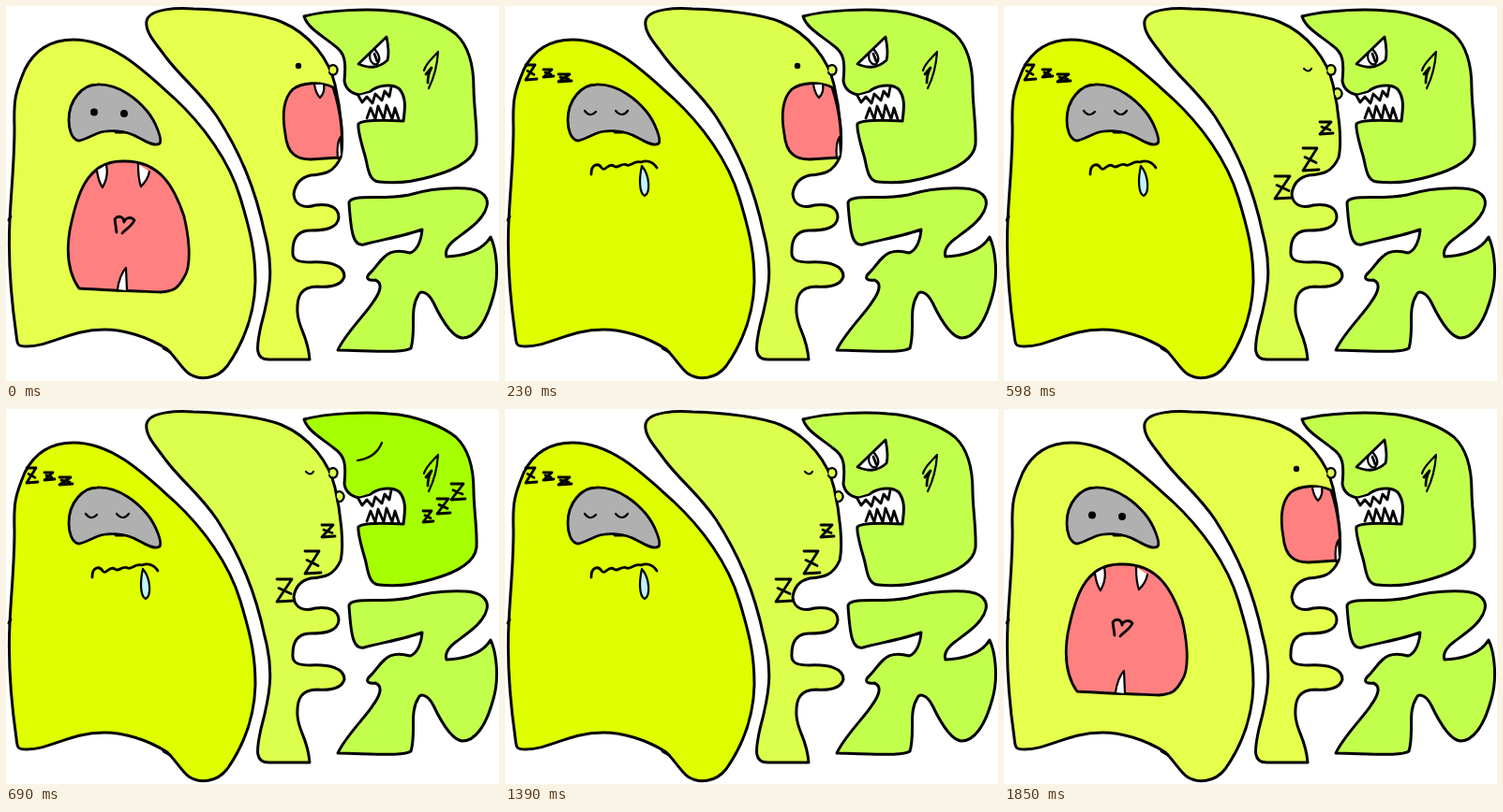
An HTML page for the animation above (2080 ms loop, 526 px wide and 401 px high).

```html
<!DOCTYPE html>
<html lang="en">
<head>
<meta charset="utf-8">
<title>Sleepy monsters</title>
<style>
html, body { margin: 0; width: 100%; height: 100%; overflow: hidden; background: #fff; }
svg { display: block; }
svg * { stroke-linecap: round; stroke-linejoin: round; }
path { fill: none; stroke: #000; stroke-width: 2.8; }
.body { fill: var(--skin); stroke-width: 3; }
.thin { stroke-width: 2.2; }
.mouth { fill: #ff8080; }
.white { fill: #fff; }
.grey { fill: #b0b0b0; }
.drool { fill: #c0f6ff; }
.asleep, .sleeping > .awake { display: none; }
.sleeping > .asleep { display: inline; }
</style>
</head>
<body>
<svg width="526" height="401" viewBox="0 0 526 401">
  <g id="blob">
    <path class="body" d="M4 229C6 190 9 165 9 130C8 100 10 92 20 68C30 48 47 36 72 36C115 36 150 72 180 99C210 127 238 165 250 205C262 245 266 265 266 295C265 335 250 365 236 385C225 399 207 401 195 393C188 388 182 377 172 367C150 353 125 346 105 346C68 346 48 364 22 364C12 364 12 362 11 352C5 310 2 270 4 229Z"/>
    <path d="M3 229l2-4M168 366l7 4"/>
    <path class="grey" d="M67 122C67 100 82 84 97 84C122 83 142 102 151 113C160 124 167 143 164 147C158 151 148 144 142 141C125 131 105 133 98 136C88 140 82 144 77 144C70 142 67 132 67 122Z"/>
    <path d="M117 135h8"/>
    <g class="awake">
      <circle cx="94" cy="113.500" r="4"/><circle cx="126" cy="115" r="4"/>
      <path class="mouth" d="M78 302C66 285 64 265 68 240C75 205 85 165 125 166C165 165 180 195 190 225C197 255 197 280 190 290C183 303 178 305 165 306C140 305 110 304 78 302Z"/>
      <path class="white thin" d="M97 176C98 183 100 190 103 194C107 187 109 179 107 170M141 169C141 180 142 188 144 193C149 188 152 183 153 177M119 303C120 294 124 284 128 280L129 304"/>
      <path d="M118 242L116 228C119 224 125 224 126 231C127 226 134 225 137 229C134 236 128 238 124 243"/>
    </g>
    <g class="asleep">
      <path class="thin" d="M85 112q6 8 12 1M118 112q7 8 13 0"/>
      <path d="M92 180C92 168 100 168 103 173C107 178 110 167 116 171C120 175 124 167 130 170C133 172 138 165 145 167C150 165 157 165 162 173"/>
      <path class="drool thin" d="M146 171C143 185 143 200 149 203C155 200 155 182 146 171Z"/>
    </g>
  </g>
  <g id="tall">
    <path class="body" d="M150 16C153 2 185 2 200 3C235 4 275 9 294 17C325 30 345 58 351 84C357 110 361 145 357 162C350 178 340 180 325 181C312 184 308 194 307 201C308 213 318 217 330 213C345 211 355 215 355 226C354 238 340 240 325 240C310 240 306 250 306 262C305 272 312 274 325 274C345 273 361 277 361 289C358 300 345 301 332 300C315 300 310 310 311 328C312 345 322 352 324 378L282 378C265 379 267 365 272 342C282 305 286 280 276 243C266 195 250 157 225 118C206 90 188 78 170 54C160 40 148 28 150 16Z"/>
    <path class="body thin" d="M346 64C351 61 355 66 353 71C351 75 346 74 345 71"/>
    <g class="awake">
      <circle cx="312" cy="64" r="3.200"/>
      <path class="mouth" d="M349 87C335 80 315 82 306 89C295 100 295 120 298 137C300 158 310 164 325 164L356 162C361 145 358 115 349 87Z"/>
      <path class="white thin" d="M329 84C330 90 332 95 335 98C339 94 340 89 339 84M354 163C353 153 354 144 357 140L358 158"/>
    </g>
    <g class="asleep">
      <path class="thin" d="M320 67q5 5 8 0"/>
      <path class="body thin" d="M353 89C358 86 362 92 360 96C358 100 353 100 353 96"/>
    </g>
  </g>
  <g id="head">
    <path class="body" d="M318 11C345 4 385 3 408 5C440 7 468 20 480 30C496 45 499 68 499 88C499 105 503 130 502 148C500 165 480 175 455 182C435 188 415 190 398 188C386 187 386 170 383 160C378 143 375 132 376 126C382 121 405 122 424 123C426 108 427 98 420 89C412 82 395 85 388 92L378 95C368 94 362 88 361 80C363 60 362 50 350 42C338 32 322 24 318 11Z"/>
    <path class="white" d="M376 96L380 103L385 97L391 104L394 94L401 101L404 91L409 97L411 87M385 120L389 109L394 121L397 107L403 121L406 106L412 121L415 109L419 121"/>
    <path class="thin" d="M461 49C454 57 448 61 446 69M461 49C460 65 456 78 451 88"/>
    <path d="M448 73L454 66C451 71 450 76 450 82"/>
    <g class="awake">
      <path class="white" d="M376 62L406 33C408 43 409 51 407 58C396 68 386 66 376 62Z"/>
      <path class="thin" d="M389 49C386 58 392 64 396 62C400 58 398 52 394 47"/>
      <path d="M393 51l3 8"/>
    </g>
    <path class="asleep thin" d="M375 55Q395 52 401 36"/>
  </g>
  <path class="body" style="--skin:#c2ff4d" d="M366 211C366 200 400 208 430 202C450 196 470 194 490 195C510 196 515 206 513 214C510 228 495 238 480 249C471 256 468 262 470 268C490 267 508 262 517 247C524 262 526 290 520 310C512 340 500 355 487 355C476 354 465 336 456 317C450 305 442 304 440 309C430 325 438 345 432 366C425 371 400 369 354 368C362 350 385 328 392 316C400 305 402 296 394 293C388 294 383 292 387 287C394 281 396 275 404 268C410 262 420 261 431 264C438 262 443 252 444 239C425 246 400 250 382 255C370 258 368 240 366 211Z"/>
</svg>
<script>
const STEP = 230, HOLD = 700, LOOP = 6 * STEP + HOLD;

// Skin colour by number of sleepers; snores are [x, y, width, height].
const monsters = [
  { id: "blob", skins: ["#e6ff4d", "#dfff00", "#dfff00", "#dfff00"],
    snores: [[22, 63, 11, 16], [41, 68, 10, 8], [57, 73, 13, 8]] },
  { id: "tall", skins: ["#e6ff4d", "#dcff4d", "#dcff4d", "#dcff4d"],
    snores: [[337, 124, 13, 13], [319, 152, 16, 24], [289, 182, 17, 24]] },
  { id: "head", skins: ["#c2ff4d", "#c2ff4d", "#c2ff4d", "#a6ff00"],
    snores: [[445, 109, 10, 12], [460, 96, 13, 16], [475, 80, 14, 17]] }
];

function snorePath([x, y, w, h]) {
  return `M${x} ${y}h${w - 1}L${x} ${y + h}l${w + 1}-1M${x + 2} ${y + h * 0.4}l${w - 4} ${h * 0.25}`;
}

for (const m of monsters) {
  m.el = document.getElementById(m.id);
  const path = document.createElementNS("http://www.w3.org/2000/svg", "path");
  path.setAttribute("class", "asleep");
  path.setAttribute("d", m.snores.map(snorePath).join(""));
  m.el.append(path);
}

function sleepersAt(t) {
  const rise = Math.floor(t / STEP);
  const fall = Math.floor((LOOP - t - 0.001) / STEP);
  return Math.min(3, rise, fall);
}

const start = performance.now();

function draw(now) {
  const count = sleepersAt(Math.max(0, now - start) % LOOP);
  monsters.forEach((m, i) => {
    m.el.classList.toggle("sleeping", i < count);
    m.el.style.setProperty("--skin", m.skins[count]);
  });
  requestAnimationFrame(draw);
}
draw(start);
</script>
</body>
</html>
```
